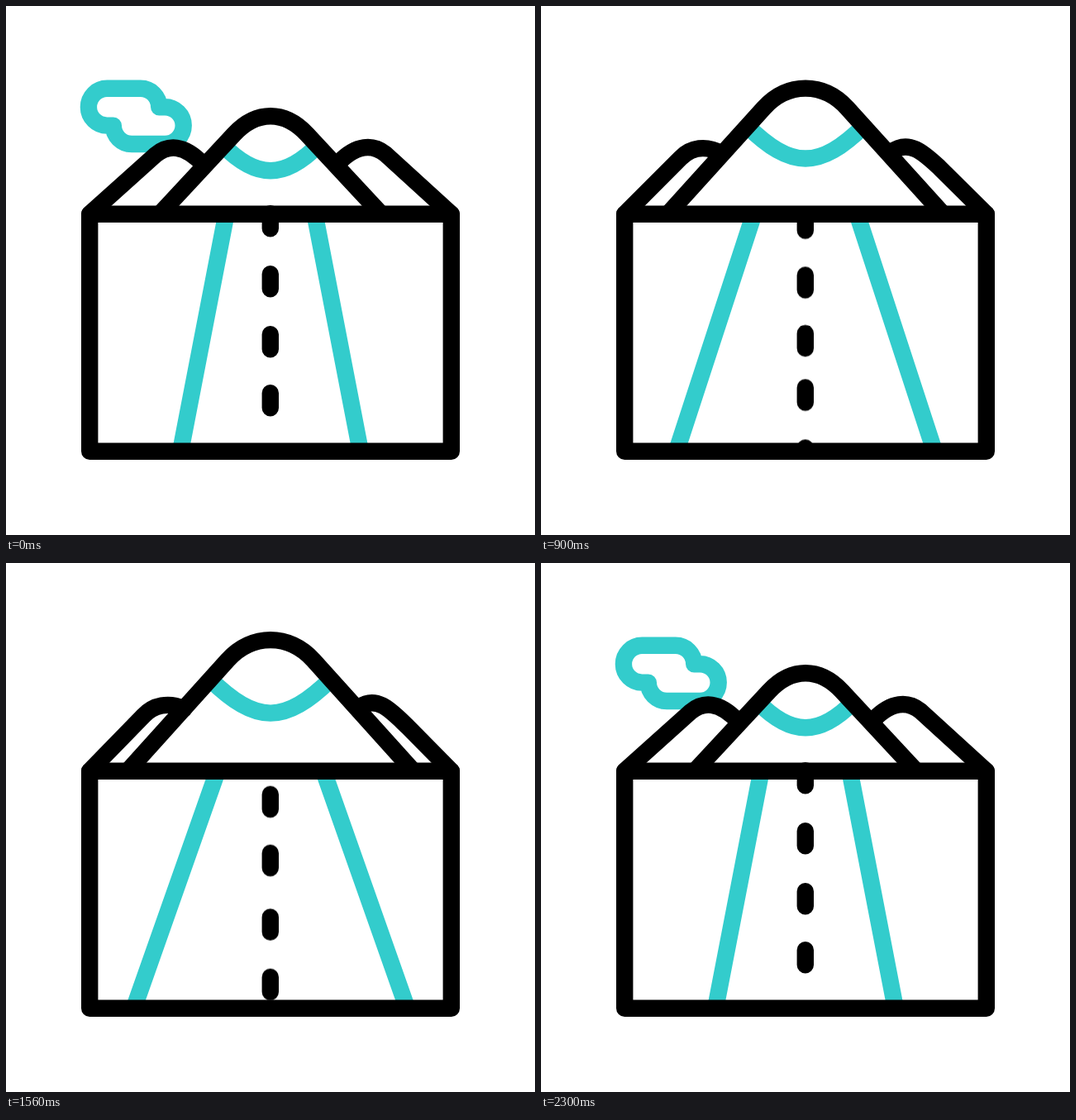
Animation, 640 px wide and 640 px high, one loop 2.4 s. Source, as an HTML page:

```html
<!DOCTYPE html>
<html lang="en">
<head>
<meta charset="utf-8">
<title>Mountain road</title>
<style>
  html, body { margin: 0; width: 100%; height: 100%; overflow: hidden; background: #fff; }
  svg { display: block; width: 100%; height: 100%; }

  path, rect { fill: none; stroke: #000; stroke-width: 20.4; stroke-linejoin: round; stroke-linecap: round; }
  .teal { stroke: #3cc; stroke-linecap: butt; }

  .cloud, .dashes, .morph {
    animation: 2400ms cubic-bezier(.3333, 0, .6667, 1) infinite;
  }
  .cloud { animation-name: drift; }
  .dashes { animation-name: drive; }
  .morph { d: var(--far); animation-name: approach; }

  .peak {
    --far: path("M186 251.7 L276 155 C303 126 337 126 364 155 L454 251.7");
    --near: path("M144.7 251.7 L267.6 115 C297 82.3 343 82.3 372.4 115 L495.3 251.7");
  }
  .snow {
    --far: path("M262 168 C303 209.7 337 209.7 378 168");
    --near: path("M245 138 C303 194.6 337 194.6 395 138");
  }
  .left {
    --far: path("M101.2 251.7 L181 180 C196 167.5 215 167 238 191");
    --near: path("M101.2 251.7 L165.3 185.2 C177.2 172.2 195.1 168 214 175.3");
  }
  .right {
    --far: path("M538.8 251.7 L459 179 C444 167 424 167 402 190");
    --near: path("M538.8 251.7 L488.3 199.9 C469.1 181.6 451.2 158.6 429.2 173.3");
  }
  .road {
    --far: path("M266.5 251.7 L211.1 538.8 M373.5 251.7 L428.9 538.8");
    --near: path("M255.2 251.7 L150.9 538.8 M384.8 251.7 L489.1 538.8");
  }

  @keyframes approach {
    0%, 5.417%, 93.333%, 100% { d: var(--far); }
    51.25%, 60% { d: var(--near); }
  }
  @keyframes drive {
    0% { transform: translateY(0); }
    91.667%, 100% { transform: translateY(575px); }
  }
  @keyframes drift {
    0% { transform: translateX(0); opacity: 1; }
    24.167% { transform: translateX(57.5px); opacity: 0; }
    65.833% { transform: translateX(-41.8px); opacity: 0; }
    87.917%, 100% { transform: translateX(0); opacity: 1; }
  }
</style>
</head>
<body>
<svg viewBox="0 0 640 640">
  <clipPath id="ground"><rect x="91" y="241.5" width="458" height="307.5"/></clipPath>

  <path class="teal cloud" d="M122.3 99.8 H162.8 A22.4 22.4 0 0 1 185.2 122.2 H192.3 A22.4 22.4 0 0 1 192.3 167 H152.2 A22.4 22.4 0 0 1 129.8 144.6 H122.3 A22.4 22.4 0 0 1 122.3 99.8 Z"/>
  <path class="teal morph snow"/>
  <path class="teal morph road"/>
  <path class="morph left"/>
  <path class="morph right"/>
  <path class="morph peak"/>
  <g clip-path="url(#ground)">
    <path class="dashes" d="M319.8 -323.8 v18 m0 55 v18 m0 55 v18 m0 53 v18 m0 59.5 v18 m0 54.5 v18 m0 54 v18 m0 52.5 v18 m0 47.5 v18 m0 55 v18 m0 55 v18 m0 53 v18 m0 59.5 v18"/>
  </g>
  <rect x="101.2" y="251.7" width="437.6" height="287.1"/>
</svg>
</body>
</html>
```
